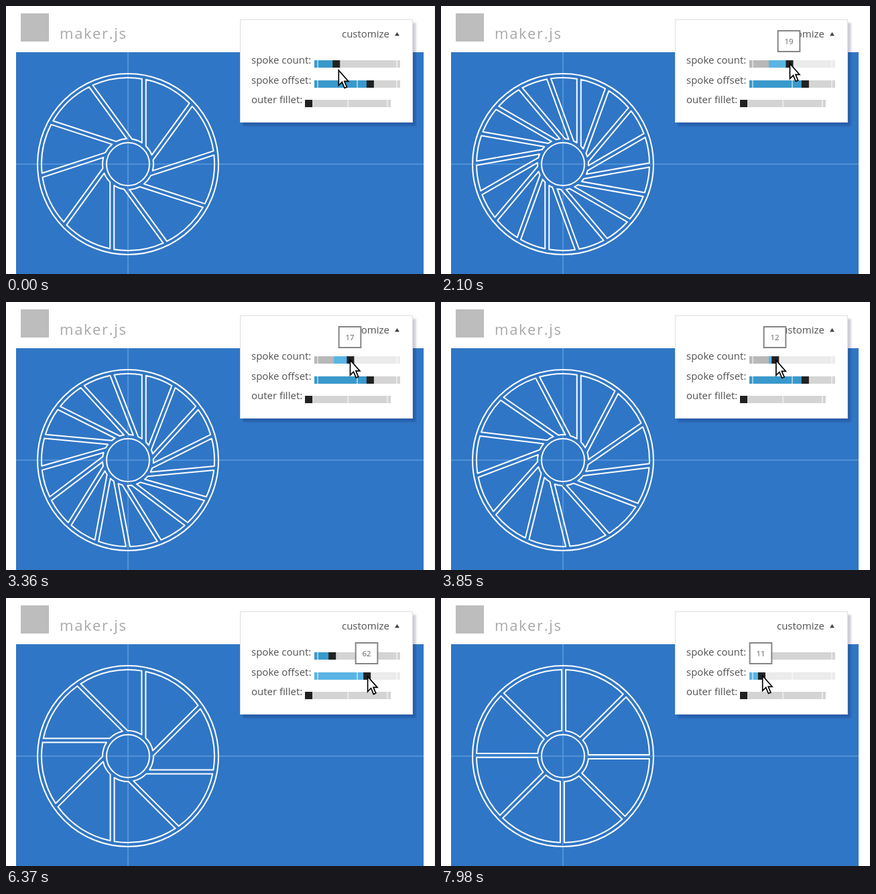
Recreate the animation shown at these times as an HTML page. Size 640 px wide and 400 px high, loop 8 s.

```html
<!DOCTYPE html>
<html lang="en">
<head>
<meta charset="utf-8">
<title>maker.js wheel</title>
<style>
  html, body { margin: 0; width: 100%; height: 100%; overflow: hidden; background: #fff; }
  svg { display: block; }
  text { font-family: "Open Sans", "Noto Sans", sans-serif; font-size: 15px; fill: #505050; }
  .title { font-size: 22px; letter-spacing: 1.7px; fill: #a8a8a8; }
  #tip text { font-size: 11.5px; text-anchor: middle; fill: #666; }
  #wheel { fill: none; stroke: #fff; stroke-width: 2; stroke-linejoin: round; }
</style>
</head>
<body>
<svg width="640" height="400" viewBox="0 0 640 400">
  <defs>
    <filter id="shadow" x="-10%" y="-10%" width="120%" height="125%">
      <feDropShadow dx="4.5" dy="5" stdDeviation="1.5" flood-color="#001030" flood-opacity=".2"/>
    </filter>
  </defs>
  <rect x="639" width="1" height="400" fill="#f0f0f0"/>
  <rect x="22" y="11" width="42" height="42" fill="#bdbdbd"/>
  <text class="title" x="80" y="49">maker.js</text>
  <rect x="15" y="69" width="608" height="331" fill="#3076c6"/>
  <path d="M15 236H623M182 69V400" stroke="#5a9be0" stroke-width="1.6"/>
  <g id="wheel">
    <circle cx="182" cy="236" r="135"/>
    <circle cx="182" cy="236" r="32"/>
    <path id="cells"/>
  </g>
  <rect x="349.5" y="20.5" width="257" height="153" fill="#fff" stroke="#dcdfe3" filter="url(#shadow)"/>
  <text x="501" y="47">customize</text>
  <path d="M580 44.5L583.5 39L587 44.5Z" fill="#444"/>
  <text x="366" y="86">spoke count:</text>
  <text x="366" y="116">spoke offset:</text>
  <text x="366" y="145">outer fillet:</text>
  <g id="sliders"></g>
  <g id="tip">
    <rect y="1" height="31" fill="#fff" stroke="#858585" stroke-width="2"/>
    <text y="21"></text>
  </g>
  <path id="cursor" d="M.8 1V23.5L5.8 18.6L9.6 27.5L13 26L9.3 17.3H15.2Z" fill="#fff" stroke="#000" stroke-width="1.7"/>
</svg>
<script>
const LOOP = 8000, STEP = 70;
const CX = 182, CY = 236, RIM = 129, HUB = 38, HALF_SPOKE = 3;
const TRACK_MIN = 465, TRACK_SPAN = 118, MAX_COUNT = 40, MAX_OFFSET = 36;
const COUNT_DRAG = 1260, COUNT_DROP = 5320, OFFSET_DRAG = 6300;

// time, x, y of the pointer
const path = [
  [0, 495, 95], [210, 495, 95], [560, 492, 86], [700, 492, 86], [770, 491, 84],
  [1190, 491, 84], [1260, 495, 84], [1400, 499, 85], [1470, 499, 85], [1540, 501, 85],
  [2310, 526, 85], [2800, 526, 85], [2870, 523, 85], [3640, 506, 86], [3780, 501, 86],
  [3850, 498.6, 86], [4200, 494, 86], [4270, 494, 86], [4690, 487, 87], [5320, 487, 87],
  [5880, 544, 116], [6230, 544, 116], [6300, 542, 116], [6790, 516, 117], [6930, 511, 117],
  [7000, 495.8, 117], [7070, 490, 117], [7560, 467, 116], [7630, 467, 116], [7770, 464, 116],
  [7840, 464, 116], [7910, 469, 115], [7980, 478.4, 115], [8000, 478.4, 115]
];

const $ = selector => document.querySelector(selector);
const clamp = (v, lo, hi) => Math.min(hi, Math.max(lo, v));

function pointer(t) {
  const i = Math.max(1, path.findIndex(p => p[0] >= t));
  const [t0, x0, y0] = path[i - 1], [t1, x1, y1] = path[i];
  const k = clamp((t - t0) / (t1 - t0), 0, 1);
  return { x: x0 + (x1 - x0) * k, y: y0 + (y1 - y0) * k };
}

function settings(t) {
  const part = clamp((pointer(t).x - TRACK_MIN) / TRACK_SPAN, 0, 1);
  return {
    count: t < COUNT_DRAG ? 10 : t < COUNT_DROP ? Math.round(1 + part * (MAX_COUNT - 1)) : 8,
    offset: t < OFFSET_DRAG ? 66 : Math.round(part * 100)
  };
}

// Point at heading a (clockwise from up) and radius r
const polar = (a, r) => `${(CX + r * Math.sin(a)).toFixed(2)} ${(CY - r * Math.cos(a)).toFixed(2)}`;

function wheelCells({ count, offset }) {
  const shift = offset / 100 * MAX_OFFSET;
  const right = shift + HALF_SPOKE, left = shift - HALF_SPOKE;
  const turn = 2 * Math.PI / count;
  let d = "";
  for (let i = 0; i < count; i++) {
    const a = i * turn, b = a + turn;
    const hubA = a + Math.asin(clamp(right / HUB, -1, 1));
    const hubB = b + Math.asin(clamp(left / HUB, -1, 1));
    d += `M${polar(a + Math.asin(right / RIM), RIM)}`;
    d += `A${RIM} ${RIM} 0 0 1 ${polar(b + Math.asin(left / RIM), RIM)}`;
    if (hubB > hubA) {
      d += `L${polar(hubB, HUB)}A${HUB} ${HUB} 0 0 0 ${polar(hubA, HUB)}Z`;
    } else {
      // neighbouring spoke edges meet before they reach the hub
      const along = (right * Math.cos(turn) - left) / Math.sin(turn);
      d += `L${polar(a + Math.atan2(right, along), Math.hypot(right, along))}Z`;
    }
  }
  return d;
}

const looks = {
  idle: ["#3a99cb", "#d4d4d4"],
  hover: ["#36a9e1", "#dedede"],
  drag: ["#5ab4e4", "#ebebeb"]
};
const bar = (x, y, w, fill) => `<rect x="${x}" y="${y}" width="${Math.max(0, w)}" height="11" fill="${fill}"/>`;

function slider(x, y, knob, look, ticks, spent = 0) {
  const [fill, track] = looks[look];
  return bar(x, y, 128, track) + bar(x, y, knob - x, fill) +
    (spent ? bar(x, y, Math.min(spent, knob - x), "#b8b8b8") : "") +
    ticks.map(k => bar(x + 4.5 + k * TRACK_SPAN, y, 1, "#fff")).join("") +
    bar(knob - 5.5, y, 11, "#222");
}

function draw(time) {
  const t = Math.floor(time / STEP) * STEP;
  const now = settings(t), mouse = pointer(t);
  const dragCount = t >= COUNT_DRAG && t < COUNT_DROP;
  const countLook = dragCount ? "drag" : t >= 350 && t < 5460 ? "hover" : "idle";
  const offsetLook = t >= 6160 ? "drag" : t >= 5810 ? "hover" : "idle";
  const countKnob = TRACK_MIN + .5 + (now.count - 1) / (MAX_COUNT - 1) * TRACK_SPAN;
  const offsetKnob = TRACK_MIN + .5 + now.offset / 100 * TRACK_SPAN;

  $("#cells").setAttribute("d", wheelCells(settings(Math.max(0, t - STEP))));
  $("#sliders").innerHTML =
    slider(460, 81, countKnob, countLook, [0, 1], dragCount ? 29 : 0) +
    slider(460, 111, offsetKnob, offsetLook, [0, .5, 1]) +
    slider(446, 140, 451.5, "idle", [.5, 1]);

  const onOffset = t >= OFFSET_DRAG;
  const value = String(onOffset ? now.offset : now.count);
  const width = 21.5 + 6.6 * value.length;
  const center = Math.round((onOffset ? offsetKnob : countKnob) - 1);
  const fade = clamp(1 - (t - COUNT_DROP + 35) / 175, 0, 1);
  const tip = $("#tip"), box = $("#tip rect"), label = $("#tip text");
  tip.setAttribute("transform", `translate(${center} ${onOffset ? 66 : 36})`);
  tip.setAttribute("opacity", dragCount || onOffset ? 1 : t >= COUNT_DROP ? fade : 0);
  box.setAttribute("x", -width / 2 + 1);
  box.setAttribute("width", width - 2);
  label.textContent = value;
  $("#cursor").setAttribute("transform", `translate(${mouse.x + .5} ${mouse.y})`);
}

const start = performance.now();
function tick() {
  draw((performance.now() - start) % LOOP);
  requestAnimationFrame(tick);
}
tick();
</script>
</body>
</html>
```
